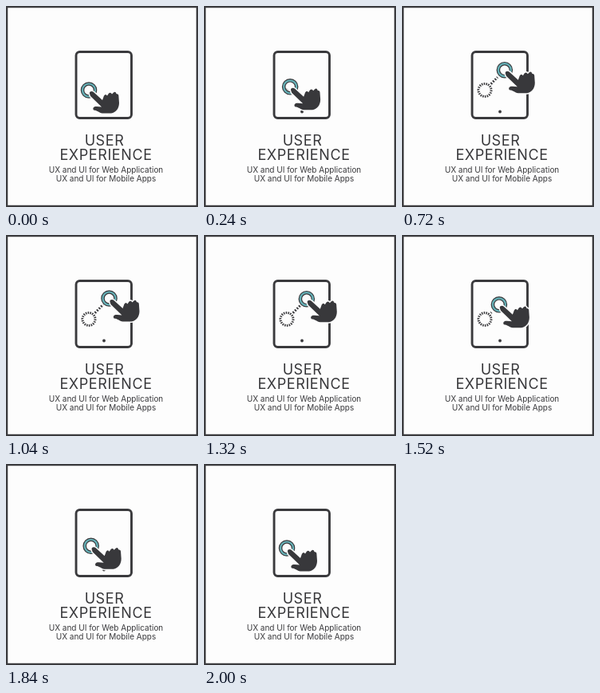
Recreate the animation shown at these times as an HTML page. Size 241x252 px, loop 2.04 s.

```html
<!DOCTYPE html>
<html lang="en">
<head>
<meta charset="utf-8">
<title>User experience</title>
<style>
  html, body { margin: 0; width: 100%; height: 100%; overflow: hidden; background: #fdfdfd; }
  svg { display: block; width: 241px; height: 252px; }
  text { font-family: Inter, "Open Sans", sans-serif; fill: #38383b; text-anchor: middle; }
  .title { font-size: 18px; letter-spacing: .6px; }
  .detail { font-size: 10px; }
  .line { fill: none; stroke: #3a3a3d; }
</style>
</head>
<body>
<svg viewBox="0 0 241 252">
  <rect class="line" x="1" y="1" width="239" height="250" stroke-width="2.5"/>
  <rect class="line" x="88" y="57.5" width="69.5" height="83" rx="4.5" stroke-width="2.9"/>
  <circle cx="123" cy="132.5" r="1.9" fill="#3a3a3d"/>
  <circle id="dial" class="line" r="8" stroke-width="3" pathLength="36" stroke-dasharray="1.1 .9"/>
  <path id="trail" class="line" stroke-width="3" stroke-dasharray="1.9 1.7"/>
  <g id="pointer">
    <circle class="line" r="8" stroke-width="4.6"/>
    <circle r="8" fill="none" stroke="#66b2b8" stroke-width="2.2"/>
    <path d="M1 4.5C0 1.5 4 .5 6 2.5L17 12.5L19 7Q21 4 23 7L25 4Q27.500 2 29 5L31 3Q33.500 1 34.500 4.500L36 5Q37.500 5 37.500 9L38 16C38 23 34 28 28 29L17 29C13 28.500 10 25 6 25C4 22 7 20 10 20.500L16 21L2 7.500Z"
      fill="#38383b" stroke="#fdfdfd" stroke-width="3" stroke-linejoin="round" paint-order="stroke"/>
  </g>
  <g class="title">
    <text x="123.500" y="175">USER</text>
    <text x="125.500" y="193">EXPERIENCE</text>
  </g>
  <g class="detail">
    <text x="125.500" y="209">UX and UI for Web Application</text>
    <text x="125.500" y="220">UX and UI for Mobile Apps</text>
  </g>
</svg>
<script>
  const LOOP = 2040, STEP = 40;
  const start = [104, 105.5], end = [129.5, 79.5];
  const [dial, trail, pointer] = ['dial', 'trail', 'pointer'].map(id => document.getElementById(id));

  const ramp = (t, a, b) => Math.min(1, Math.max(0, (t - a) / (b - a)));
  const ease = p => (1 - Math.cos(Math.PI * p)) / 2;
  // rises over a..b, falls over c..d
  const pulse = (t, a, b, c, d) => ease(ramp(t, a, b)) - ease(ramp(t, c, d));
  const along = p => start.map((v, i) => v + (end[i] - v) * p);

  function draw(now) {
    const t = Math.floor(now % LOOP / STEP) * STEP;
    const grow = pulse(t, 160, 440, 1500, 1840);
    const reach = pulse(t, 520, 800, 1320, 1560);
    pointer.setAttribute('transform', `translate(${along(pulse(t, 40, 800, 1240, 2000))})`);
    dial.setAttribute('transform', `translate(104 105.5) scale(${grow})`);
    dial.style.display = grow > .01 ? '' : 'none';
    trail.setAttribute('d', `M${along(.3)}L${along(.3 + .4 * reach)}`);
    trail.style.display = reach > .01 ? '' : 'none';
    requestAnimationFrame(draw);
  }
  requestAnimationFrame(draw);
</script>
</body>
</html>
```
